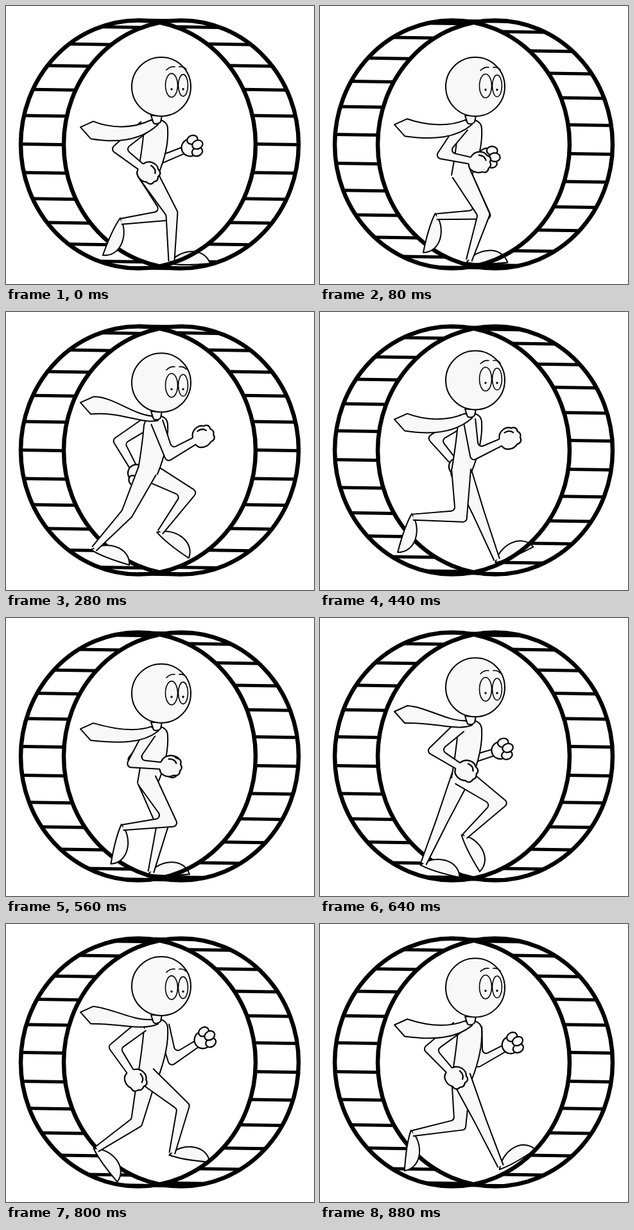
Recreate the animation shown at these times as an HTML page with a canvas. Size 480x434 px, loop 920 ms.

```html
<!DOCTYPE html>
<html lang="en">
<head>
<meta charset="utf-8">
<title>Running in a wheel</title>
<style>
  html, body { margin: 0; width: 100%; height: 100%; overflow: hidden; background: #fff; }
  canvas { display: block; }
</style>
</head>
<body>
<canvas id="stage" width="480" height="434"></canvas>
<script>
const ctx = document.getElementById('stage').getContext('2d');
const LOOP = 920, SLOT = 40, SKIN = '#f8f8f8', TURN = Math.PI * 2;

// One stride of a foot: time, heel x, heel y, foot angle in degrees.
const stride = [
  [0, 254, 402, 0],
  [100, 222, 400, 0],
  [160, 162, 388, 18],
  [270, 132, 375, 16],
  [440, 143, 315, 110],
  [460, 178, 331, 115],
  [560, 180, 322, 105],
  [620, 218, 338, 68],
  [730, 232, 341, 44],
  [890, 283, 386, -34]
];

function strideAt(time) {
  const t = time % LOOP;
  const i = stride.findLastIndex(row => row[0] <= t);
  const a = stride[i], b = stride[(i + 1) % stride.length];
  const k = (t - a[0]) / ((b[0] - a[0] + LOOP) % LOOP);
  return a.slice(1).map((v, j) => v + (b[j + 1] - v) * k);
}

function ease(x) {
  const k = Math.min(1, Math.max(0, x));
  return k * k * (3 - 2 * k);
}

// Slow rise and quick drop on each step, a little lower on the first one.
function headHeight(t) {
  const u = t * 2 / LOOP % 1;
  return 126 - 25 * (ease(u / .8) - ease((u - .94) / .06)) + 6 * Math.sin(TURN * t / LOOP);
}

// Middle joint of a two-part limb; side picks the way it bends.
function bend(a, b, upper, lower, side) {
  const dx = b[0] - a[0], dy = b[1] - a[1], dist = Math.hypot(dx, dy);
  const d = Math.min(dist, upper + lower);
  const along = (upper ** 2 - lower ** 2 + d * d) / (2 * d);
  const out = side * Math.sqrt(Math.max(0, upper ** 2 - along ** 2));
  return [a[0] + (dx * along - dy * out) / dist, a[1] + (dy * along + dx * out) / dist];
}

function shape(draw, width = 2, fill = SKIN) {
  ctx.beginPath();
  draw();
  if (fill) { ctx.fillStyle = fill; ctx.fill(); }
  ctx.lineWidth = width;
  ctx.stroke();
}

const ellipse = (x, y, rx, ry, width, fill) =>
  shape(() => ctx.ellipse(x, y, rx, ry, 0, 0, TURN), width, fill);

// Tapered limb through three joints, outlined on its two long sides.
function limb(points, widths) {
  const normal = (a, b) => {
    const d = Math.hypot(b[0] - a[0], b[1] - a[1]) || 1;
    return [(b[1] - a[1]) / d, (a[0] - b[0]) / d];
  };
  const n1 = normal(points[0], points[1]), n2 = normal(points[1], points[2]);
  const sum = [n1[0] + n2[0], n1[1] + n2[1]];
  const len = Math.hypot(...sum) || 1;
  const normals = [n1, sum.map(v => v * Math.min(2 / len, 1.6) / len), n2];
  const edge = (i, side) => points[i].map((v, j) => v + normals[i][j] * widths[i] / 2 * side);
  const trace = (order, side, joined) => {
    const [p, q, r] = order.map(i => edge(i, side));
    if (joined) ctx.lineTo(...p); else ctx.moveTo(...p);
    ctx.arcTo(...q, ...r, 6);
    ctx.lineTo(...r);
  };
  ctx.beginPath();
  trace([0, 1, 2], 1);
  trace([2, 1, 0], -1, true);
  ctx.fillStyle = SKIN;
  ctx.fill();
  shape(() => { trace([0, 1, 2], 1); trace([2, 1, 0], -1); }, 2, null);
}

function drawLeg(time, hip) {
  const [hx, hy, degrees] = strideAt(time);
  const dx = Math.cos(degrees * TURN / 360), dy = Math.sin(degrees * TURN / 360);
  const at = (along, up) => [hx + dx * along + dy * up, hy + dy * along - dx * up];
  const ankle = at(4, 4);
  shape(() => {
    ctx.moveTo(hx, hy);
    ctx.bezierCurveTo(...at(16, 23), ...at(55, 27), ...at(64, 0));
    ctx.quadraticCurveTo(...at(22, -4), hx, hy);
  });
  limb([hip, bend(hip, ankle, 74, 74, -1), ankle], [30, 18, 9]);
}

function drawFist(near) {
  if (near) {
    shape(() => {
      ctx.moveTo(-13, -6);
      ctx.bezierCurveTo(-10, -15, 2, -18, 8, -12);
      ctx.quadraticCurveTo(16, -11, 14, -4);
      ctx.quadraticCurveTo(18, 1, 14, 5);
      ctx.quadraticCurveTo(14, 13, 6, 12);
      ctx.bezierCurveTo(-2, 17, -13, 13, -14, 6);
    });
    shape(() => { ctx.moveTo(-3, -10); ctx.quadraticCurveTo(5, -11, 8, -5); }, 2, null);
  } else {
    ellipse(-3, 0, 12, 12);
    for (const k of [-1, 1, 0]) ellipse(8 - 4 * k * k, 9 * k, 7.5, 6);
  }
}

// swing runs from -1 (back) to 1 (front)
function drawArm(swing, headY, near) {
  const shoulder = [(near ? 224 : 233) + 12 * swing, headY + 62];
  const hand = [256 + 54 * swing, headY + 114 - 32 * swing];
  const elbow = bend(shoulder, hand, 55, 60, 1);
  limb([shoulder, elbow, hand], [19, 15, 10]);
  ctx.save();
  ctx.translate(...hand);
  ctx.rotate(Math.atan2(hand[1] - elbow[1], hand[0] - elbow[0]));
  ctx.scale(1.12, 1.12);
  drawFist(near);
  ctx.restore();
}

function drawTorso(nx, ny, hx, hy) {
  shape(() => {
    ctx.moveTo(hx - 15, hy + 3);
    ctx.quadraticCurveTo(nx - 22, ny + 50, nx - 19, ny + 16);
    ctx.quadraticCurveTo(nx - 16, ny, nx, ny);
    ctx.quadraticCurveTo(nx + 17, ny + 1, nx + 18, ny + 14);
    ctx.quadraticCurveTo(nx + 20, ny + 48, hx + 16, hy + 5);
  });
}

function drawTie(x, y, lift) {
  ctx.save();
  ctx.translate(x, y);
  const near = 13 + lift / 2, far = 10 + lift * 1.4;
  shape(() => {
    ctx.moveTo(-8, 1);
    ctx.bezierCurveTo(-36, near, -70, far, -98, lift);
    ctx.lineTo(-118, lift + 9);
    ctx.lineTo(-102, lift + 27);
    ctx.bezierCurveTo(-55, far + 24, -21, near + 16, 3, 8);
    ctx.closePath();
  });
  shape(() => {
    ctx.moveTo(-8, -6);
    ctx.lineTo(9, -6);
    ctx.lineTo(7, 4);
    ctx.quadraticCurveTo(2, 9, -4, 6);
    ctx.closePath();
  });
  ctx.restore();
}

function drawHead(x, y, look) {
  ellipse(x, y, 46, 46);
  const ex = x + 16, ey = y + look;
  for (const [dx, rx, ry] of [[0, 9.5, 18.5], [18, 7.5, 17]]) {
    ellipse(ex + dx, ey, rx, ry, 1.6, SKIN);
    ellipse(ex + dx, ey + 6, 1.2, 1.4, 1, '#000');
  }
  shape(() => {
    ctx.moveTo(ex - 8, ey - 24);
    ctx.quadraticCurveTo(ex - 2, ey - 30, ex + 5, ey - 29);
    ctx.moveTo(ex + 12, ey - 29);
    ctx.quadraticCurveTo(ex + 19, ey - 30, ex + 23, ey - 25);
  }, 1.6, null);
}

const rim = x => ellipse(x, 216, 183, 193.5, 6.5, null);

function drawRungs(step) {
  shape(() => {
    for (let k = 0; k < 24; k++) {
      const a = (k * 15 + step * 5) * TURN / 360;
      const angle = a - .1 * Math.sin(2 * a) + .023 * Math.sin(4 * a);
      const x = 206 + 183 * Math.cos(angle), y = 216 + 193.5 * Math.sin(angle);
      ctx.moveTo(x, y - .5);
      ctx.lineTo(x + 67, y + .5);
    }
  }, 5, null);
}

function draw(now) {
  let t = Math.floor(now % LOOP / SLOT) * SLOT;
  if (t === 200) t = 160; // the only pose held for two slots
  ctx.fillStyle = '#fff';
  ctx.fillRect(0, 0, 480, 434);
  ctx.strokeStyle = '#000';
  ctx.lineJoin = ctx.lineCap = 'round';

  const x = 242, y = headHeight(t);
  const hip = [220, 160 + .8 * y];
  const swing = Math.cos(TURN * (t - 330) / LOOP);
  const lift = -13 + 17 * Math.cos(TURN * (t * 2 / LOOP - .05));
  drawRungs(Math.floor(t * 12 / LOOP));
  rim(273);
  drawArm(-swing, y, false);
  drawLeg(t + LOOP / 2, hip);
  drawTorso(x - 8, y + 51, ...hip);
  drawLeg(t, hip);
  drawArm(swing, y, true);
  drawTie(x - 8, y + 51, lift);
  drawHead(x, y, -1.5 - lift / 5);
  rim(206);
  requestAnimationFrame(draw);
}
requestAnimationFrame(draw);
</script>
</body>
</html>
```
